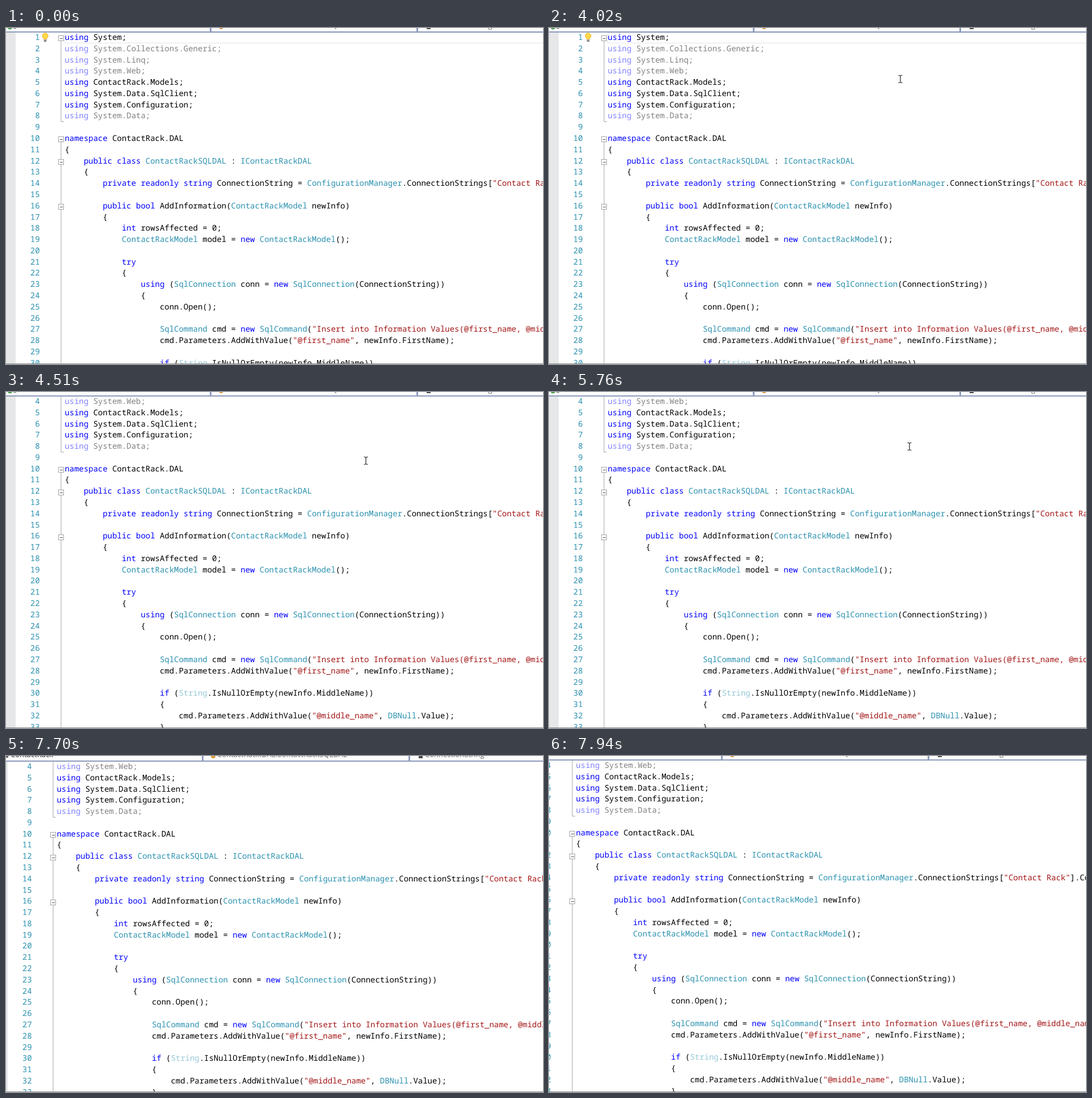
An HTML page for the animation above (8000 ms loop, 946x592 px).

```html
<!DOCTYPE html>
<html lang="en">
<head>
<meta charset="utf-8">
<title>Code editor</title>
<style>
  html, body { margin: 0; width: 100%; height: 100%; overflow: hidden; background: #fff; }
  #stage { position: relative; width: 946px; height: 592px; overflow: hidden; background: #fff; }
  #stage div, #stage svg { position: absolute; }
  #stage #world { left: 0; top: 0; width: 1100px; height: 680px; animation: pan 8s step-end infinite; }
  #gutter { left: 0; top: 0; width: 17px; height: 680px; background: #e6e7e8; }
  #scroll { left: 0; top: 0; width: 1100px; height: 760px; animation: scroll 8s step-end infinite; }
  #scroll > svg { left: 0; top: 0; }

  #code {
    left: 0; top: 7px; width: 1100px;
    font: 13.96px/19.785px "Noto Sans Mono", "DejaVu Sans Mono", monospace;
    text-rendering: geometricPrecision; font-variant-ligatures: none;
    white-space: pre; color: #000;
  }
  #stage #code .line { position: relative; height: 19.785px; padding-left: 103.5px; }
  .line i { position: absolute; left: 0; width: 59.6px; text-align: right; font-style: normal; color: #2b91af; }
  .key { color: #00f; }
  .type { color: #2b91af; }
  .str { color: #a31515; }
  .faint { color: #95c8d7; }
  .dim { color: #808080; }
  .dim .key { color: #8080ff; }
  #current { left: 103px; top: 8px; width: 1100px; height: 17px; border: 1px solid #e4e4ea; }

  #strip {
    left: 0; top: -22px; width: 1100px; height: 28px; overflow: hidden;
    background: #fdfdfe; border-bottom: 2px solid #8e9bbc;
    font: 13px/20px "Open Sans", "Noto Sans", sans-serif; white-space: pre; color: #6d6d6d;
  }
  #strip .label { top: 7px; }
  #strip .bar { top: 0; width: 3px; height: 28px; background: #8e9bbc; }
  #hover { left: 362px; top: 0; width: 361px; height: 28px; background: #fffcf4; animation: hover 8s step-end infinite; }

  #beam, #arrow { left: 0; top: 0; }
  #beam { animation: beam 8s step-end infinite; }
  #arrow { animation: arrow 8s step-end infinite; }
  #edge { left: 0; top: 591px; width: 946px; height: 1px; background: #8c8c8c; }

  @keyframes pan {
    0% { left: 0; top: 0; }
    96.25% { left: -14px; top: 2px; }
    97.75% { left: -35px; top: 1px; }
    99.25%, 100% { left: -56px; top: 0; }
  }
  @keyframes scroll {
    0% { top: 0; }
    56.375%, 100% { top: -59.36px; }
  }
  @keyframes hover {
    0% { opacity: 0; }
    75% { opacity: 1; }
    82.625%, 100% { opacity: 0; }
  }
  @keyframes beam {
    0% { transform: translate(0, -60px); }
    8% { transform: translate(564px, 18px); }
    9.5% { transform: translate(562px, 84px); }
    11% { transform: translate(560px, 136px); }
    12.5% { transform: translate(559px, 96px); }
    14% { transform: translate(561px, 28px); }
    15.5% { transform: translate(0, -60px); }
    50.25% { transform: translate(619px, 90px); }
    51.75% { transform: translate(628px, 108px); }
    53.25% { transform: translate(634px, 121px); }
    72% { transform: translate(635px, 96px); }
    73.5% { transform: translate(637px, 44px); }
    75%, 100% { transform: translate(0, -60px); }
  }
  @keyframes arrow {
    0% { transform: translate(0, -60px); }
    75% { transform: translate(638px, 1px); }
    76.5% { transform: translate(0, -60px); }
    81.125% { transform: translate(636px, 2px); }
    82.625%, 100% { transform: translate(0, -60px); }
  }
</style>
</head>
<body>
<div id="stage">
  <div id="world">
    <div id="gutter"></div>
    <div id="scroll">
      <div id="current"></div>
      <svg width="110" height="760" fill="none" stroke="#a5a5a5">
        <path d="M97 17V165H102M97 195V760"/>
        <g id="folds" shape-rendering="crispEdges"></g>
        <path d="M66.6 19.5C66.6 17.5 64 17 64 14a5 5 0 0 1 10 0C74 17 71.4 17.5 71.4 19.5Z" fill="#ffd94a" stroke="#e3b020"/>
        <path d="M66.5 21.5h5M67 23.5h4" stroke="#6b6b6b" stroke-width="1.3"/>
      </svg>
      <div id="code"></div>
    </div>
    <div id="strip">
      <div id="hover"></div>
      <div class="bar" style="left:359px"></div>
      <div class="bar" style="left:723px"></div>
      <svg width="760" height="28" style="left:0;top:0">
        <circle cx="7" cy="20" r="4.5" fill="#4f9e4f"/>
        <path d="M13 15h5v8h-5z" fill="#666"/>
        <circle cx="379" cy="20" r="4" fill="#d9963a"/>
        <path d="M741 16h7v8h-7z" fill="#4a4a4a"/>
      </svg>
      <div class="label" style="left:22px;color:#1e1e1e">ContactRack</div>
      <div class="label" style="left:386px">ContactRack.DAL.ContactRackSQLDAL</div>
      <div class="label" style="left:752px">ConnectionString</div>
    </div>
  </div>
  <div id="edge"></div>
  <svg id="beam" width="1" height="1" overflow="visible" fill="none" stroke="#222" stroke-width="1.2">
    <path d="M-3.5 -6.5H-1.5L0 -5.5L1.5 -6.5H3.5M0 -5.5V5.5M-3.5 6.5H-1.5L0 5.5L1.5 6.5H3.5"/>
  </svg>
  <svg id="arrow" width="1" height="1" overflow="visible" fill="#fff" stroke="#000">
    <path d="M0 0V16L4 12.5L6.5 18L9 17L6.5 11.5H11.5Z"/>
  </svg>
</div>
<script>
const source = `using System;
using System.Collections.Generic;
using System.Linq;
using System.Web;
using ContactRack.Models;
using System.Data.SqlClient;
using System.Configuration;
using System.Data;

namespace ContactRack.DAL
{
    public class ContactRackSQLDAL : IContactRackDAL
    {
        private readonly string ConnectionString = ConfigurationManager.ConnectionStrings["Contact Rack"].ConnectionString;

        public bool AddInformation(ContactRackModel newInfo)
        {
            int rowsAffected = 0;
            ContactRackModel model = new ContactRackModel();

            try
            {
                using (SqlConnection conn = new SqlConnection(ConnectionString))
                {
                    conn.Open();

                    SqlCommand cmd = new SqlCommand("Insert into Information Values(@first_name, @middle_name, @last_name)", conn);
                    cmd.Parameters.AddWithValue("@first_name", newInfo.FirstName);

                    if (String.IsNullOrEmpty(newInfo.MiddleName))
                    {
                        cmd.Parameters.AddWithValue("@middle_name", DBNull.Value);
                    }`;

const words = text => new Set(text.split(" "));
const keys = words("using namespace public class private readonly string bool int new try if");
const types = words("ContactRackSQLDAL IContactRackDAL ConfigurationManager ContactRackModel SqlConnection SqlCommand DBNull");
const unused = new Set([2, 3, 4, 8]);
const pitch = 19.785;

function kind(word) {
  if (word[0] === '"') return "str";
  if (word === "String") return "faint";
  if (keys.has(word)) return "key";
  return types.has(word) ? "type" : "";
}

function paint(line) {
  return line.replace(/"[^"]*"|\w+/g, word => {
    const name = kind(word);
    return name ? `<span class="${name}">${word}</span>` : word;
  });
}

document.getElementById("code").innerHTML = source.split("\n").map((line, i) =>
  `<div class="line${unused.has(i + 1) ? " dim" : ""}"><i>${i + 1}</i>${paint(line)}</div>`
).join("");

document.getElementById("folds").innerHTML = [1, 10, 12, 16].map(n => {
  const y = Math.round(17 + (n - 1) * pitch) + 0.5;
  return `<rect x="92.5" y="${y - 4}" width="9" height="9" fill="#fff"/>` +
    `<path d="M94.5 ${y + 0.5}h5" stroke="#555"/>`;
}).join("");
</script>
</body>
</html>
```
